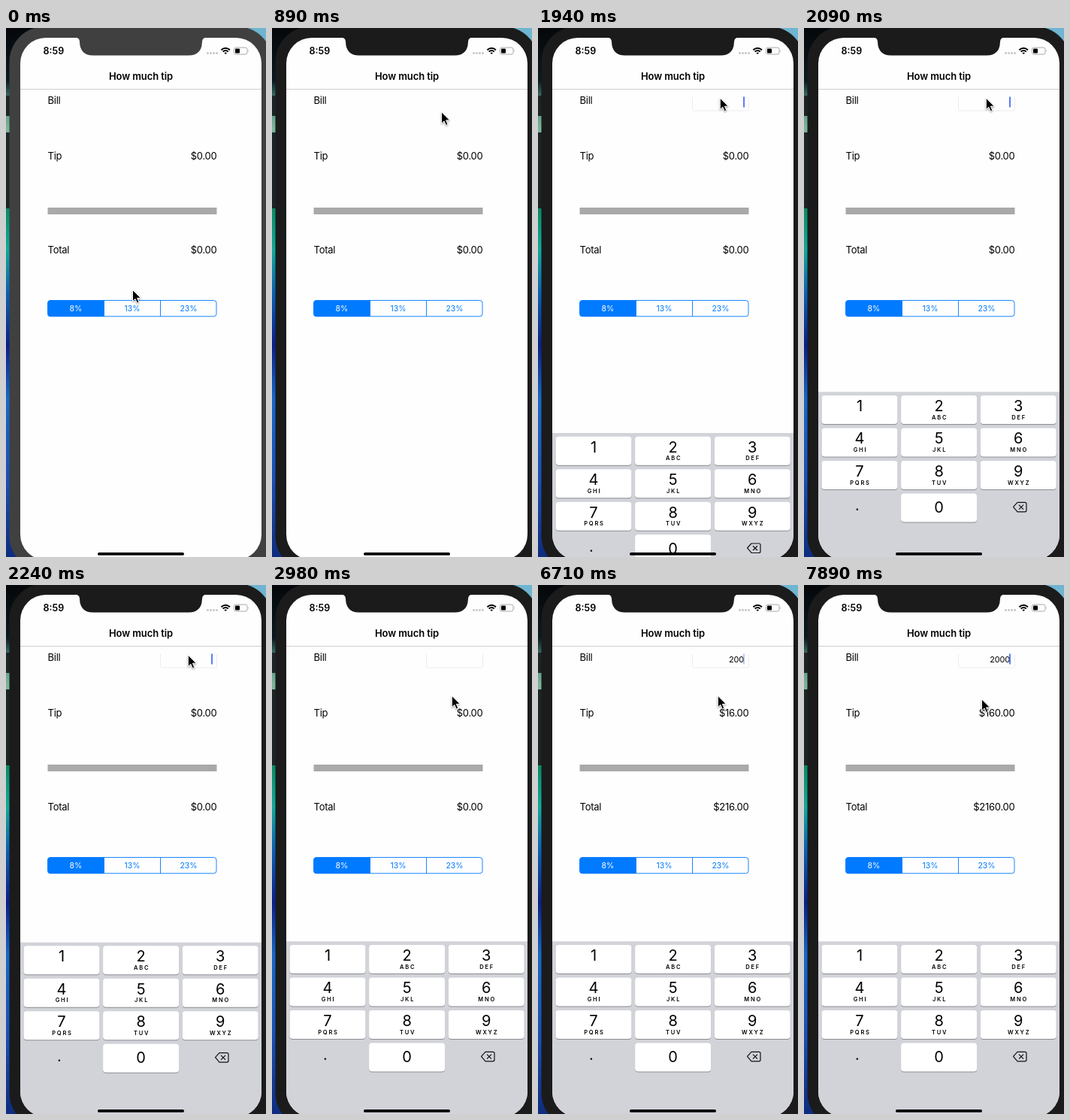
Animation of 346 by 704 pixels, one loop 8000 ms. Source, as an HTML page:

```html
<!DOCTYPE html>
<html lang="en">
<head>
<meta charset="utf-8">
<title>How much tip</title>
<style>
  html, body { margin: 0; width: 100%; height: 100%; overflow: hidden; background: #06131c; }
  svg { display: block; width: 346px; height: 704px; font-family: Inter, "Liberation Sans", sans-serif; }
  .label { font-size: 13px; letter-spacing: -.25px; }
  .end { text-anchor: end; }
  .mid { text-anchor: middle; }
  .bold { font-weight: 600; }
  .seg { font-size: 10.5px; fill: #007aff; }
  .digit { font-size: 20px; }
  .letters { font-size: 7.5px; letter-spacing: 1.8px; font-weight: 600; }
</style>
</head>
<body>
<svg viewBox="0 0 346 704">
  <defs>
    <linearGradient id="desk" x2="0" y2="1">
      <stop offset="0" stop-color="#05070a"/>
      <stop offset=".1" stop-color="#0a1a20"/>
      <stop offset=".14" stop-color="#4a8f7c"/>
      <stop offset=".19" stop-color="#7db59a"/>
      <stop offset=".34" stop-color="#0a8a62"/>
      <stop offset=".42" stop-color="#13a99a"/>
      <stop offset=".5" stop-color="#0c62b4"/>
      <stop offset=".6" stop-color="#0a1f8c"/>
      <stop offset=".7" stop-color="#1769c9"/>
      <stop offset=".85" stop-color="#1a50b8"/>
      <stop offset="1" stop-color="#0e2c7c"/>
    </linearGradient>
    <clipPath id="screen"><rect x="19" y="13" width="321" height="695" rx="34"/></clipPath>
  </defs>

  <rect width="346" height="704" fill="url(#desk)"/>
  <path d="M0 90H6V117H0ZM0 139H6V240H0Z" fill="#1c2426"/>
  <path d="M300 0H346V40Z" fill="#6fb4d0"/>
  <rect id="bezel" x="4.5" y="-2" width="350" height="725" rx="47"/>

  <g clip-path="url(#screen)">
    <rect x="19" y="13" width="321" height="695" fill="#fefefe"/>
    <path d="M19 81.5H340" stroke="#cfcfcf"/>
    <text class="bold" x="49.5" y="35" font-size="12.5">8:59</text>
    <text class="bold mid" x="179.5" y="69" font-size="13" letter-spacing="-.1">How much tip</text>

    <g fill="#c4c4c4">
      <circle cx="268.5" cy="33.5" r="1.4"/><circle cx="272.5" cy="33.5" r="1.4"/>
      <circle cx="276.5" cy="33.5" r="1.4"/><circle cx="280.5" cy="33.5" r="1.4"/>
    </g>
    <g fill="none" stroke="#000" stroke-width="1.9">
      <path d="M286.4 29.2Q292.2 24.2 298 29.2M288.6 31.6Q292.2 28.6 295.8 31.6"/>
      <path d="M290.3 33L292.2 35L294.1 33Q292.2 31.8 290.3 33Z" fill="#000" stroke="none"/>
    </g>
    <rect x="303.5" y="26" width="17.5" height="9" rx="2.4" fill="none" stroke="#a8a8a8"/>
    <rect x="305" y="27.5" width="6" height="6" rx="1"/>
    <path d="M322.3 29Q324 30.5 322.3 32Z" fill="#a8a8a8"/>

    <g class="label">
      <text x="55.5" y="100.5">Bill</text>
      <text x="55.5" y="175">Tip</text>
      <text x="55.5" y="300">Total</text>
      <text id="tip" class="end" x="280.5" y="175"></text>
      <text id="total" class="end" x="280.5" y="300"></text>
    </g>
    <rect x="55.5" y="239" width="225" height="9" fill="#a9a9a9"/>

    <path d="M130.5 362.5H59a3.5 3.5 0 0 0 -3.5 3.5V380.5a3.5 3.5 0 0 0 3.5 3.5H130.5Z" fill="#007aff"/>
    <g fill="none" stroke="#007aff" stroke-width=".9">
      <rect x="55.5" y="362.5" width="224.5" height="21.3" rx="3.5"/>
      <path d="M130.5 362.5V384M205.5 362.5V384"/>
    </g>
    <g class="seg mid">
      <text x="93" y="377" style="fill:#fff">8%</text>
      <text x="168" y="377">13%</text>
      <text x="243" y="377">23%</text>
    </g>

    <g id="field">
      <path d="M205.5 92V108Q205.5 110 207.5 110H278.5Q280.5 110 280.5 108V92" fill="none" stroke="#ececec"/>
      <text id="bill" class="end" x="274" y="102.5" font-size="11" letter-spacing="-.2"></text>
      <rect id="caret" x="273.2" y="91.5" width="1.7" height="14" fill="#4166ee"/>
    </g>

    <g id="keyboard"><rect x="19" width="321" height="240" fill="#d1d3d9"/></g>
    <rect x="122" y="698" width="115" height="3.8" rx="1.9"/>
  </g>

  <path id="notch" d="M92 12.5Q98 13 98 18.5Q98.5 36.5 116 36.5H243Q260.5 36.5 261 18.5Q261 13 267 12.5Z"/>
  <path id="cursor" d="M0 0V15.3L3.5 12L6 17.6L8.5 16.5L6.1 11H11Z" stroke="#fff" stroke-width="1"
        style="filter:drop-shadow(0 1px 1px #0006)"/>
</svg>
<script>
const LOOP = 8000, SAMPLE = 149;
const el = id => document.getElementById(id);

function buildKeyboard() {
  const letters = ['', 'ABC', 'DEF', 'GHI', 'JKL', 'MNO', 'PQRS', 'TUV', 'WXYZ'];
  const key = (label, col, row, sub = '') => {
    const x = 23.5 + col * 105.6, y = 4.7 + row * 43.5, mid = x + 50.5;
    return `<rect x="${x}" y="${y + 1}" width="101" height="38" rx="4" fill="#8b8d92"/>
      <rect x="${x}" y="${y}" width="101" height="38" rx="4" fill="#fff"/>
      <text class="digit mid" x="${mid}" y="${y + (label ? 21 : 25.5)}">${label}</text>
      <text class="letters mid" x="${mid + 1}" y="${y + 31.7}">${sub}</text>`;
  };
  const keys = letters.map((sub, i) => key(i + 1, i % 3, Math.floor(i / 3), sub));
  keys.push(key(0, 1, 3), '<text class="digit mid" x="71" y="158">.</text>',
    `<g fill="none" stroke="#111" stroke-width="1.2" stroke-linejoin="round">
      <path d="M278.5 153L284 147H294Q296 147 296 149V157.5Q296 159.5 294 159.5H284Z"/>
      <path d="M286 150.3L292 156.3M292 150.3L286 156.3"/></g>`);
  el('keyboard').insertAdjacentHTML('beforeend', keys.join(''));
}

// Value of the last [time, value] pair reached
const held = (steps, t) => steps.filter(s => s[0] <= t + 15).pop()[1];

const bills = [[0, ''], [4620, '2'], [5070, '20'], [5670, '200'], [7450, '2000']];
const carets = [[0, 1], [2540, 0], [2690, 1], [2980, 0], [3570, 1], [4020, 0], [4470, 1],
  [6270, .4], [6410, 0], [6710, .4], [6860, 1], [7300, 0], [7450, 1]];
const spots = [[0, [168.5, 348.5]], [150, [191.5, 214]], [1490, [242.3, 93.2]],
  [2540, [227, 118]], [2690, [239.3, 147.5]], [7890, [236.5, 152]]];

function cursorAt(t) {
  const [x, y] = held(spots, t);
  if (t < 300 || t > 1480) return [x, y];
  const p = Math.min(1, (t - 298) / 745), ease = p * p * (3 - 2 * p);
  return [x + (229.5 - x) * ease, y + (100 - y) * ease];
}

function keyboardTop(t) {
  const s = 0.016 * Math.max(0, t - 1779);
  return 474.3 + 229.7 * (1 + s) * Math.exp(-s);
}

function draw(now) {
  const t = Math.floor((now % LOOP + 8) / SAMPLE) * SAMPLE;
  const bill = held(bills, t);
  el('bill').textContent = bill;
  el('tip').textContent = '$' + (bill * 0.08).toFixed(2);
  el('total').textContent = '$' + (bill * 1.08).toFixed(2);
  el('field').style.display = t >= 1639 ? '' : 'none';
  el('caret').style.opacity = held(carets, t);
  el('keyboard').setAttribute('transform', `translate(0 ${keyboardTop(t)})`);
  el('cursor').setAttribute('transform', `translate(${cursorAt(t)})`);
  const body = t < 440 ? '#404040' : '#1b1b1b';
  el('bezel').style.fill = el('notch').style.fill = body;
}

buildKeyboard();
const start = performance.now();
function tick() {
  draw(performance.now() - start);
  requestAnimationFrame(tick);
}
tick();
</script>
</body>
</html>
```
